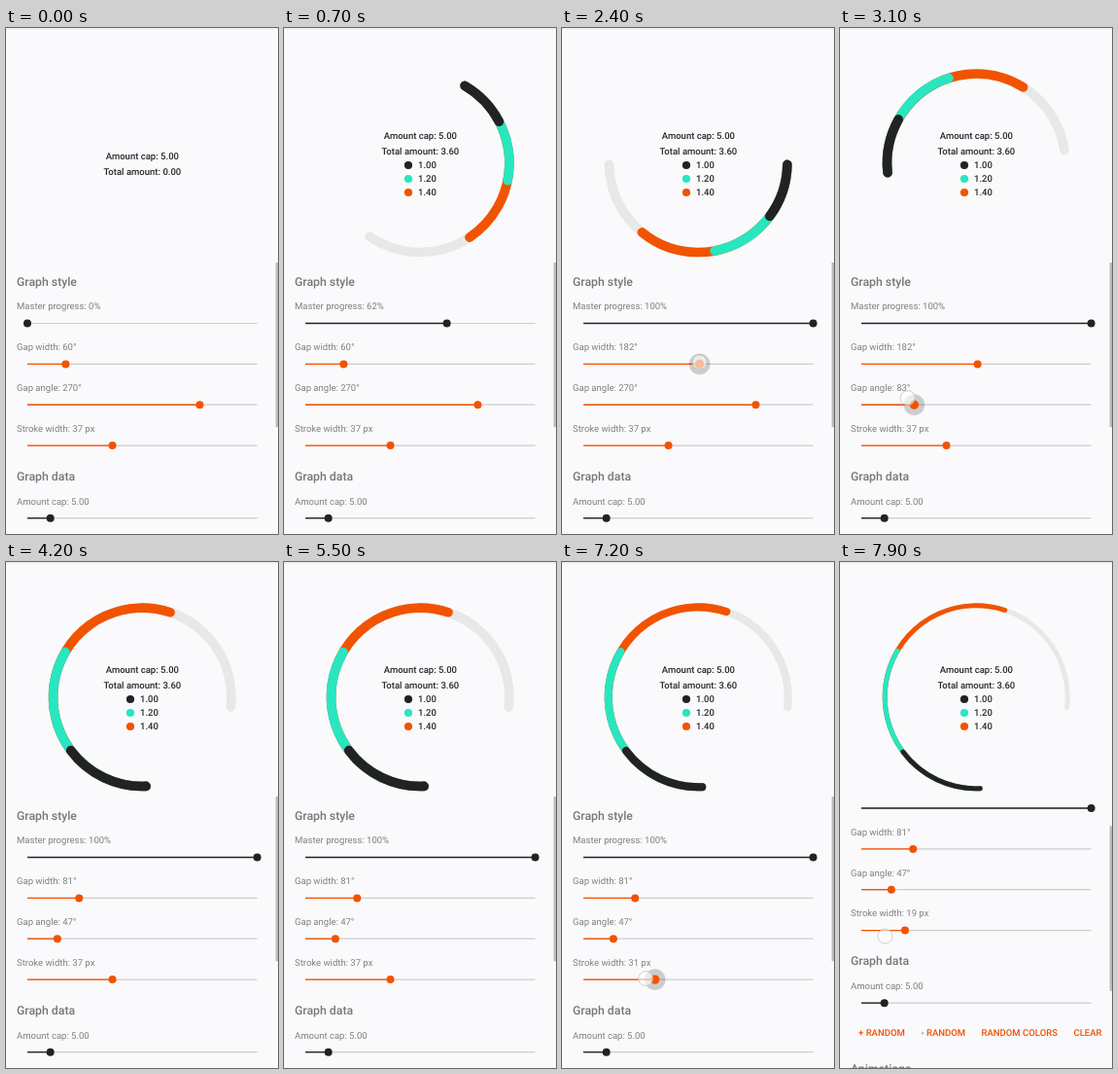
These frames come from a looping animation (280x520 px, 8000 ms). An HTML page:

```html
<!DOCTYPE html>
<html lang="en">
<head>
<meta charset="utf-8">
<title>Donut graph controls</title>
<style>
  html, body { margin: 0; width: 100%; height: 100%; overflow: hidden; background: #faf9fb; }
  svg { display: block; }
  #stage { width: 100%; height: 100%; }
  text { font: 400 9.53px Roboto, sans-serif; fill: #808082; text-rendering: geometricPrecision; }
  .strong { font-weight: 500; fill: #28282b; }
  .heading { font-size: 12.25px; font-weight: 500; fill: #777779; }
  .button { font-weight: 500; fill: #ee5200; }
  .middle { text-anchor: middle; }
  .arc { fill: none; stroke-linecap: round; }
</style>
</head>
<body>
<svg id="stage" viewBox="0 0 280 520"></svg>
<script>
const LOOP = 8000;
const BLACK = '#222225', TEAL = '#28e6c0', ORANGE = '#f15300', GREY = '#e7e8e8';
const CENTER = { x: 140.2, y: 138.8 }, OUTER_RADIUS = 96.5;
const PX = 280 / 1080;
const TRACK_LEFT = 22, TRACK_WIDTH = 236.6;
const PANEL_TOP = 241;
const CAP = 5;
const LINES = [[1.0, BLACK], [1.2, TEAL], [1.4, ORANGE]];
const LEGEND_SHIFT = 21;

const SLIDERS = [
  { id: 'master', y: 303.5, max: 100, color: BLACK, label: v => `Master progress: ${v}%` },
  { id: 'gapWidth', y: 345.4, max: 360, color: ORANGE, label: v => `Gap width: ${v}°` },
  { id: 'gapAngle', y: 387.2, max: 360, color: ORANGE, label: v => `Gap angle: ${v}°` },
  { id: 'stroke', y: 429.1, max: 100, color: ORANGE, label: v => `Stroke width: ${v} px` },
  { id: 'cap', y: 503.7, max: 50, color: BLACK, label: v => `Amount cap: ${v.toFixed(2)}` },
];

// Each drag moves one slider between two values; dy is the finger's offset from the track.
const DRAGS = [
  { id: 'gapWidth', from: 60, to: 182, start: 1680, end: 2400, dy: -2 },
  { id: 'gapAngle', from: 270, to: 47, start: 2580, end: 3278, dy: -7 },
  { id: 'gapWidth', from: 182, to: 81, start: 3480, end: 3900, dy: -3 },
  { id: 'stroke', from: 37, to: 80, start: 5850, end: 6780, dy: -1 },
  { id: 'stroke', from: 80, to: 19, start: 6830, end: 7350, dy: -1 },
];
const SCROLL = { start: 7450, end: 7900, distance: 50.5, x: 46.5, y: 435 };
const FINGER_LEAD = 30, HOLD = 50;
const DATA_START = 200, MASTER_START = 300, REVEAL = 1000;

const clamp = v => Math.min(1, Math.max(0, v));
const span = (t, start, end) => clamp((t - start) / (end - start));
const smooth = u => u * u * (3 - 2 * u);
const decelerate = u => 1 - (1 - u) ** 3;

// Cubic Bezier (0.4, 0, 0.2, 1), solved by bisection.
function fastOutSlowIn(x) {
  let low = 0, high = 1;
  for (let i = 0; i < 20; i++) {
    const s = (low + high) / 2;
    const bx = 1.2 * s * (1 - s) ** 2 + 0.6 * s * s * (1 - s) + s ** 3;
    if (bx < x) low = s; else high = s;
  }
  return smooth(low);
}

const text = (x, cy, content, cls = '', id = '') =>
  `<text x="${x}" y="${cy + 3.4}" class="${cls}" id="${id}">${content}</text>`;

const arc = id => `<circle id="${id}" class="arc" pathLength="360"/>`;

const slider = ({ id, y, color }) => `
  ${text(11, y - 17.6, '', '', id + 'Label')}
  <path d="M${TRACK_LEFT} ${y}h${TRACK_WIDTH}" stroke="#cdcdcf" stroke-width="1.2"/>
  <line id="${id}Active" x1="${TRACK_LEFT}" y1="${y}" y2="${y}" stroke="${color}" stroke-width="1.35"/>
  <circle id="${id}Ripple" cy="${y}" r="10.8" fill="#000"/>
  <circle id="${id}Thumb" cy="${y}" fill="${color}"/>`;

const legend = LINES.map(([amount, color], i) => {
  const y = 141 + i * 14;
  return `<circle cx="128" cy="${y}" r="4.1" fill="${color}"/>` +
    text(138, y, amount.toFixed(2), 'strong');
}).join('');

const buttons = [[19, '+ RANDOM'], [83.5, '- RANDOM'], [145.5, 'RANDOM COLORS'], [240.5, 'CLEAR']]
  .map(([x, name]) => text(x, 533.8, name, 'button')).join('');

document.getElementById('stage').innerHTML = `
  <rect width="280" height="520" fill="#faf9fb"/>
  <rect width="280" height="1.5" fill="#eeeeef"/>
  <g id="donut">${arc('background')}${arc('line2')}${arc('line1')}${arc('line0')}</g>
  <g id="summary">
    ${text(140.4, 131.2, 'Amount cap: 5.00', 'strong middle')}
    ${text(140.4, 147.2, '', 'strong middle', 'total')}
  </g>
  <g id="legend">${legend}</g>
  <svg y="${PANEL_TOP}" width="280" height="279" viewBox="0 ${PANEL_TOP} 280 279">
    <g id="content">
      ${text(11, 261.3, 'Graph style', 'heading')}
      ${text(11, 461.3, 'Graph data', 'heading')}
      ${SLIDERS.map(slider).join('')}
      ${buttons}
      ${text(11, 571.7, 'Animations', 'heading')}
    </g>
    <rect id="scrollbar" x="277.6" width="2.4" height="169.5" fill="#bcbcbe"/>
  </svg>
  <circle id="finger" r="7.5" fill="#fff" fill-opacity=".6" stroke="#bbb" stroke-width=".7"/>`;

const nodes = {};
document.querySelectorAll('[id]').forEach(node => { nodes[node.id] = node; });

function set(id, attributes) {
  for (const name in attributes) nodes[id].setAttribute(name, attributes[name]);
}

function valuesAt(t) {
  const values = {
    master: 100 * fastOutSlowIn(span(t, MASTER_START, MASTER_START + REVEAL)),
    gapWidth: 60, gapAngle: 270, stroke: 37, cap: CAP,
  };
  for (const d of DRAGS) {
    if (t >= d.start) values[d.id] = d.from + (d.to - d.from) * smooth(span(t, d.start, d.end));
  }
  return values;
}

const thumbX = (s, value) => TRACK_LEFT + TRACK_WIDTH * value / s.max;
const isHeld = (d, t) => t >= d.start - HOLD && t < d.end + HOLD;

function drawDonut(t, v) {
  const width = v.stroke * PX;
  const sweep = (360 - v.gapWidth) * v.master / 100;
  const growth = decelerate(span(t, DATA_START, DATA_START + REVEAL));
  const drawArc = (id, length, color) => set(id, {
    cx: CENTER.x, cy: CENTER.y, r: OUTER_RADIUS - width / 2,
    stroke: color, 'stroke-width': width,
    'stroke-dasharray': `${length} 720`,
    visibility: length > 0 ? 'visible' : 'hidden',
  });
  set('donut', { transform: `rotate(${v.gapAngle + v.gapWidth / 2} ${CENTER.x} ${CENTER.y})` });
  drawArc('background', sweep, GREY);
  let total = 0;
  LINES.forEach(([amount, color], i) => {
    total += amount;
    drawArc('line' + i, sweep * growth * total / CAP, color);
  });
  const loaded = t >= DATA_START;
  nodes.total.textContent = `Total amount: ${(loaded ? total : 0).toFixed(2)}`;
  set('summary', { transform: `translate(0 ${loaded ? -LEGEND_SHIFT : 0})` });
  set('legend', { visibility: loaded ? 'visible' : 'hidden' });
}

function drawSliders(t, v) {
  for (const s of SLIDERS) {
    const x = thumbX(s, v[s.id]);
    const drags = DRAGS.filter(d => d.id === s.id);
    const press = Math.max(0, ...drags.map(d =>
      span(t, d.start - HOLD, d.start + 100) * (1 - span(t, d.end + HOLD, d.end + 250))));
    nodes[s.id + 'Label'].textContent = s.label(Math.round(v[s.id]));
    set(s.id + 'Active', { x2: x });
    set(s.id + 'Ripple', { cx: x, opacity: 0.18 * press });
    set(s.id + 'Thumb', { cx: x, r: 4 + 0.7 * press });
  }
}

function drawFinger(t, scroll) {
  const drag = DRAGS.find(d => isHeld(d, t));
  const scrolling = t >= SCROLL.start - HOLD;
  set('finger', { visibility: drag || scrolling ? 'visible' : 'hidden' });
  if (drag) {
    const s = SLIDERS.find(item => item.id === drag.id);
    const ahead = valuesAt(t + FINGER_LEAD)[s.id];
    set('finger', { cx: thumbX(s, ahead), cy: s.y + drag.dy });
  } else if (scrolling) {
    set('finger', { cx: SCROLL.x, cy: SCROLL.y - scroll });
  }
}

function draw(t) {
  const v = valuesAt(t);
  const scroll = SCROLL.distance * smooth(span(t, SCROLL.start, SCROLL.end));
  drawDonut(t, v);
  drawSliders(t, v);
  set('content', { transform: `translate(0 ${-scroll})` });
  set('scrollbar', { y: 240.7 + scroll * 0.607 });
  drawFinger(t, scroll);
}

const origin = performance.now();
function tick() {
  draw((performance.now() - origin) % LOOP);
  requestAnimationFrame(tick);
}
tick();
</script>
</body>
</html>
```
